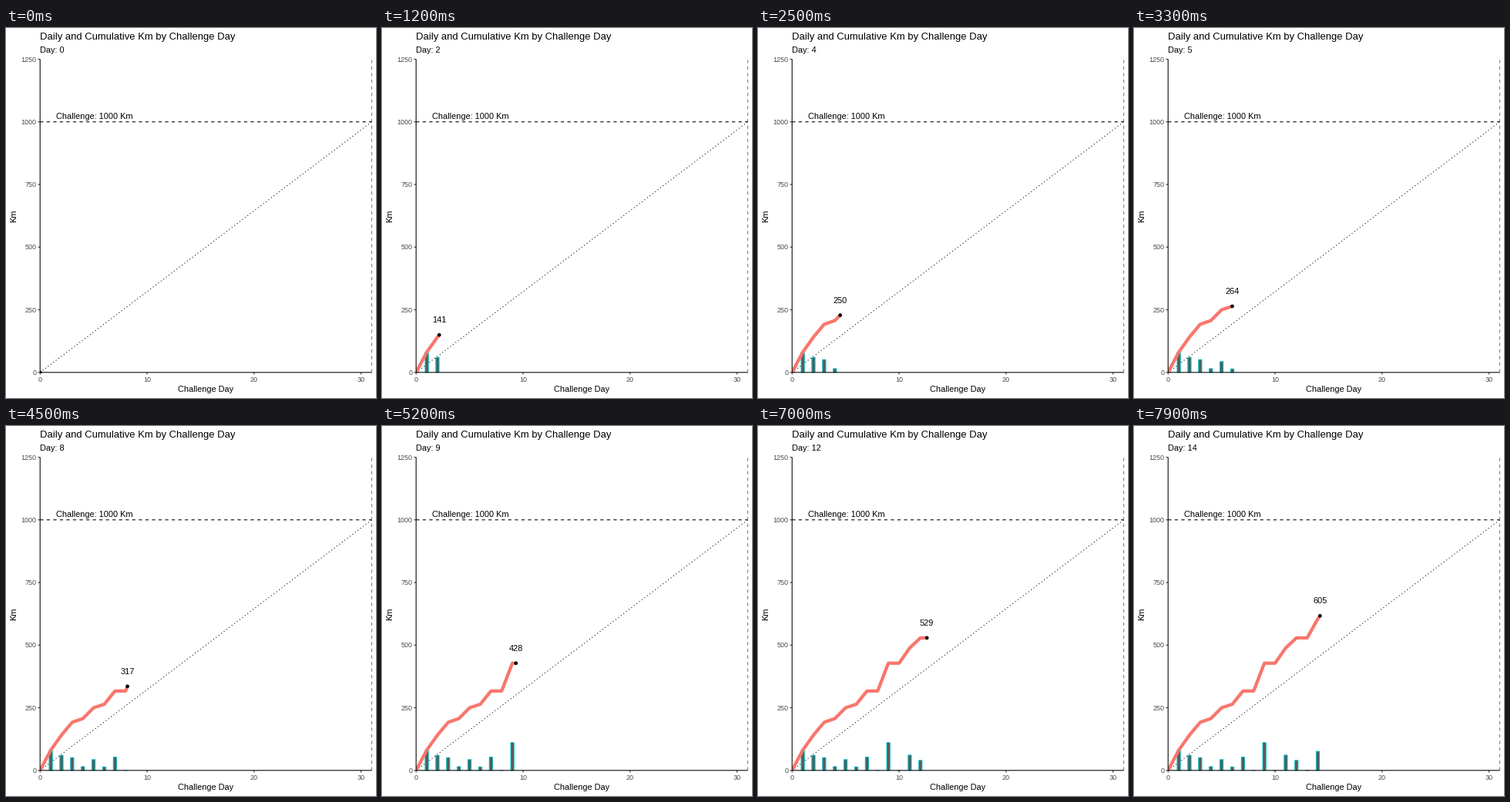
A matplotlib script for the animation above (8 s loop, 480 by 480 pixels).

```python
import matplotlib.pyplot as plt
import numpy as np
from matplotlib.animation import FuncAnimation
from matplotlib.patches import Circle, Rectangle

plt.rcParams.update({"font.family": "Liberation Sans", "path.snap": False})

SIZE, FRAMES, INTERVAL = 480, 80, 100
LEFT, RIGHT, TOP, BOTTOM = 44.2, 474.5, 40.5, 446.8
LAST_DAY, MAX_KM, GOAL = 31, 1250, 1000
MM = 72.27 / 25.4 * 0.75  # plot millimetres to line pixels
THIN, THICK = 0.5 * MM, 2 * MM
BAR_WIDTH = 0.3

daily = np.array([0, 81, 60, 51, 15, 43, 14, 53, 0, 111, 0, 61, 40, 0, 76, 60])
total = np.cumsum(daily)
days = np.arange(len(daily))
# each day is reached on a whole animation step
reached = np.round(days / 0.18).astype(int)


def px(day):
    return LEFT + (RIGHT - LEFT) * day / LAST_DAY


def py(km):
    return BOTTOM - (BOTTOM - TOP) * km / MAX_KM


fig = plt.figure(figsize=(SIZE / 72, SIZE / 72), dpi=72, facecolor="white")
ax = fig.add_axes([0, 0, 1, 1])
ax.set_xlim(0, SIZE)
ax.set_ylim(SIZE, 0)
ax.axis("off")
panel = Rectangle((LEFT, TOP), RIGHT - LEFT + 1, BOTTOM - TOP + 1,
                  transform=ax.transData)


def line(x, y, color="black", lw=THIN, **kw):
    return ax.plot(x, y, color=color, lw=lw, solid_capstyle="butt",
                   dash_capstyle="butt", **kw)[0]


def text(x, y, s, size=11, color="black", ha="left", **kw):
    return ax.text(x, y, s, size=size, color=color, ha=ha, va="baseline", **kw)


# reference lines
dashed, dotted = (0, (4, 4)), (0, (1, 3))
line([LEFT, RIGHT], [py(GOAL)] * 2, ls=dashed, zorder=2)
line([RIGHT, RIGHT], [BOTTOM, TOP], "#7F7F7F", ls=dashed, zorder=2)
line([px(0), px(LAST_DAY)], [py(0), py(GOAL)], ls=dotted, zorder=2)
text(65, 118, "Challenge: 1000 Km", zorder=6)

# axes
line([LEFT, LEFT], [BOTTOM, TOP], zorder=8)
line([LEFT, RIGHT], [BOTTOM, BOTTOM], zorder=8)
for km in range(0, MAX_KM + 1, 250):
    line([LEFT - 2.75, LEFT], [py(km)] * 2, "#333333", zorder=7)
    text(39.3, py(km) + 3.2, str(km), 9, "#4D4D4D", "right")
for day in range(0, LAST_DAY, 10):
    line([px(day)] * 2, [BOTTOM, BOTTOM + 2.75], "#333333", zorder=7)
    text(px(day), 459, str(day), 9, "#4D4D4D", "center")
text((LEFT + RIGHT) / 2, 472, "Challenge Day", ha="center")
text(13, (TOP + BOTTOM) / 2, "Km", ha="center", rotation=90,
     rotation_mode="anchor")
text(LEFT, 15, "Daily and Cumulative Km by Challenge Day", 13)
subtitle = text(LEFT, 32, "")

# moving parts
bars = []
for day, km in zip(days, daily):
    bar = Rectangle((px(day - BAR_WIDTH / 2), py(km)),
                    px(BAR_WIDTH) - px(0), py(0) - py(km),
                    fc="#595959", ec="#00BFC4", lw=THIN, zorder=3)
    bars.append(ax.add_patch(bar))
    bar.set_clip_path(panel)
path = line([], [], "#F8766D", THICK, solid_joinstyle="round", zorder=4)
dot = ax.add_patch(Circle((0, 0), 2.35, fc="black", lw=0, zorder=5))
path.set_clip_path(panel)
dot.set_clip_path(panel)
label = text(0, 0, "", ha="center", zorder=6)


def update(i):
    x = np.interp(i, reached, days)
    km = np.interp(x, days, total)
    done = reached <= i

    for day, bar in enumerate(bars):
        bar.set_visible(bool(day > 0 and done[day]))
    path.set_data(px(np.append(days[done], x)), py(np.append(total[done], km)))
    dot.center = px(x), py(km)

    nearest = int(x + 0.5)
    label.set_position((px(x), py(km) - 16))
    label.set_text(str(total[nearest]) if nearest else "")
    subtitle.set_text(f"Day: {18 * i // 100}")
    return [*bars, path, dot, label, subtitle]


anim = FuncAnimation(fig, update, frames=FRAMES, interval=INTERVAL,
                     repeat=True, repeat_delay=0)
plt.show()
```
